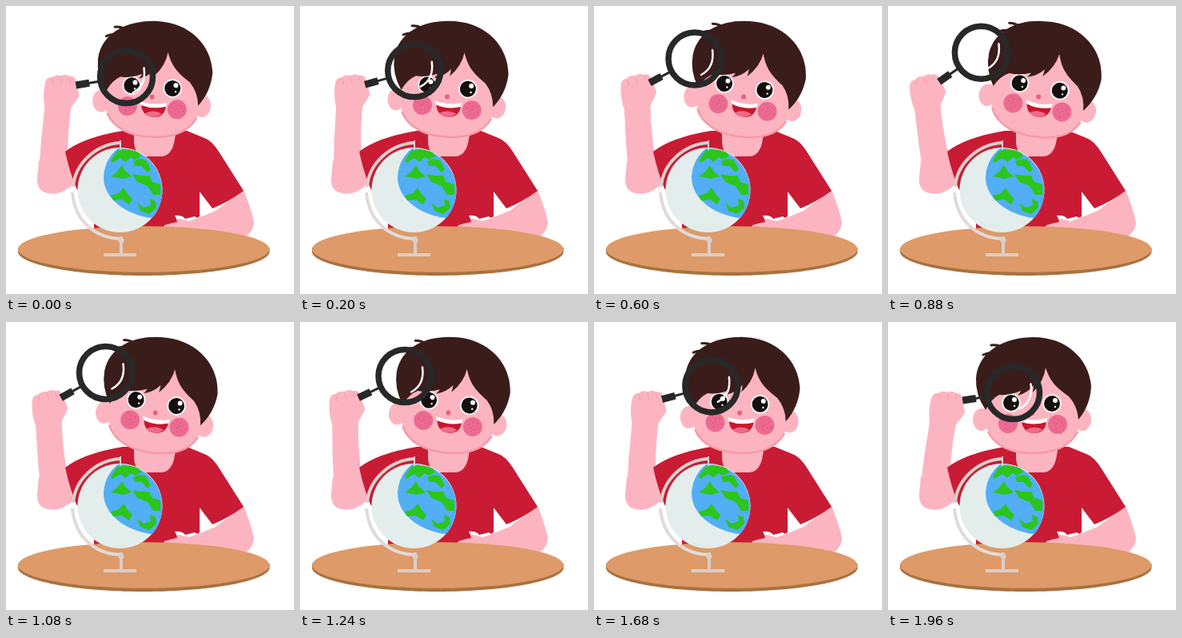
Recreate the animation shown at these times as an HTML page. Size 360x360 px, loop 2 s.

```html
<!DOCTYPE html>
<html lang="en">
<head>
<meta charset="utf-8">
<title>Boy with a globe</title>
<style>
  html, body { margin: 0; width: 100%; height: 100%; overflow: hidden; background: #fff; }
  svg { display: block; width: 100vw; height: 100vh; }
  .skin { fill: #fcb5c0; }
</style>
</head>
<body>
<svg viewBox="0 0 360 360">
  <path class="skin" d="M41 194L60 176L78 182L87 221L79 227Q66 237 52 234Q38 231 39 215Z"/>
  <g id="forearm">
    <path class="skin" d="M54 96Q56 88 63 89Q68 85 74 88Q80 85 85 89Q92 88 93 96L96 114Q90 122 85 128Q80 152 78 182V195Q60 214 42 195L45 170L52 126Q50 110 54 96Z"/>
    <path d="M63 90l1 8M74 89l1 8M85 90l0 7" fill="none" stroke="#f49cab"/>
  </g>

  <path class="skin" d="M297 230Q306 252 310 270Q310 280 300 288H220L208 274L235 267L262 256Z"/>
  <path fill="#c91b34" d="M146 156Q97 164 74 182Q79 206 88 228L110 250V278H214L242 263V232L258 253Q278 245 297 231L266 182Q257 168 248 165L226 156Z"/>
  <path fill="#fff" d="M211 262Q220 261 224 266L236 263L243 268L225 272L214 268Z"/>
  <path class="skin" d="M198 274Q207 271 214 270Q212 265 217 266L228 269Q246 263 263 258L280 280H196Z"/>
  <path class="skin" d="M160 150H214L211 166Q208 188 193 188H174Q160 187 160 168Z"/>

  <path fill="#a8723f" d="M15 302H329.500V307C329 323 259 337 172 337S15 323 15 307Z"/>
  <ellipse cx="172.200" cy="304" rx="157.200" ry="28.800" fill="#de9a68"/>

  <g id="head">
    <ellipse class="skin" cx="117" cy="122" rx="11" ry="14"/>
    <ellipse class="skin" cx="243" cy="122" rx="11" ry="14"/>
    <path class="skin" d="M122 80V122C123 151 149 165 181 165S239 151 240 122V70L195 40Z"/>
    <path fill="none" stroke="#f79aa6" stroke-width="2.500" d="M125 137C134 156 156 164 181 164S228 156 237 137"/>
    <g id="face"></g>
    <circle cx="180" cy="114" r="3" fill="#ee5f78"/>
    <path fill="#c9162d" d="M167 123Q183 127 198 122Q198 139 182 139Q168 138 167 123Z"/>
    <path fill="#fff" d="M165 120Q182 125 199 120L198 125Q182 130 167 125Z"/>
    <path fill="#f0698a" d="M172 135Q182 129 193 134Q189 139 182 139Q176 139 172 135Z"/>
    <path fill="#3a1d1a" d="M122 110Q109 91 110 70C113 36 146 19 182 19C222 19 251 45 254 80Q253 104 238 122Q237 105 226 93C212 83 203 76 197 57Q195 74 181 88Q182 83 182 79Q174 89 162 92Q165 89 166 86Q152 92 139 91Q129 96 122 110Z"/>
    <path fill="none" stroke="#3a1d1a" stroke-width="3" stroke-linecap="round" d="M148 40Q143 27 129 29M139 43Q131 35 119 41"/>
  </g>

  <g id="globe">
    <circle cx="142.500" cy="230" r="53" fill="#e3eeec"/>
    <path fill="#52aef5" d="M140 178A53 53 0 0 1 183 265C158 263 122 245 122 214Q123 192 140 178Z"/>
    <g fill="#2cc51b">
      <path d="M139 181Q152 177 166 183L169 188L161 192L156 189L149 195L143 190L133 196L131 193Z"/>
      <path d="M131 213L139 207L145 199L149 206L157 213L146 216L137 214Z"/>
      <path d="M159 194Q168 189 175 193L181 204L177 208L169 200L161 200Z"/>
      <path d="M158 210L168 212L179 212L183 220L193 223L193 236L184 236L177 225L164 220Z"/>
      <path d="M131 237L141 234L147 227L152 235L158 241L154 248L145 242L134 243Z"/>
      <path d="M164 246L172 252L181 249L180 241L187 244L188 252L179 260L168 256Z"/>
    </g>
    <g fill="none" stroke="#d9cfcb" stroke-width="4">
      <path d="M143 168V180" stroke-width="2"/>
      <path d="M143 171C111 173 86 198 84 226"/>
      <path d="M83 233C86 268 110 290 144 291" stroke="#e0dbda"/>
      <path d="M144 288V311M122 311H163"/>
    </g>
    <circle cx="144" cy="293" r="3.500" fill="#d9cfcb"/>
  </g>

  <g id="lens" fill="none">
    <g id="handle" stroke="#282828">
      <path d="M-36 0H-50" stroke-width="3"/>
      <path d="M-47 0H-64" stroke-width="9"/>
    </g>
    <circle r="33" stroke="#282828" stroke-width="7.500"/>
    <path d="M22-11Q25 11 8 20" stroke="#fff" stroke-width="2.500" stroke-linecap="round"/>
  </g>
</svg>
<script>
const byId = id => document.getElementById(id);
const dot = (x, y, r, fill) => `<circle cx="${x}" cy="${y}" r="${r}" fill="${fill}"/>`;

const eye = (x, y) => dot(x, y, 11.7, '#fff') + dot(x, y, 10, '#160f10') +
  dot(x + 4, y - 4, 3, '#fff') + dot(x + 4, y + 4, 1.2, '#fff');
const cheek = (x, y) => {
  let marks = dot(x, y, 12, '#ec6a92');
  for (let i = 0; i < 9; i++) {
    const r = 2.9 * Math.sqrt(i), a = i * 2.4;
    marks += dot(x + r * Math.cos(a), y - 1 + r * Math.sin(a), 0.6, '#c44567');
  }
  return marks;
};
byId('face').innerHTML = cheek(150, 127) + cheek(212, 128) + eye(154, 101) + eye(205, 102);

// time, lens x, lens y, handle angle, forearm angle, head angle
const poses = [
  [0, 150.5, 88.5, -9.5, -3, 3],
  [360, 136.5, 74.5, -21, -8, 6],
  [600, 126, 66, -28, -12, 8],
  [870, 116, 58, -35, -16, 9.5],
  [1240, 131, 67.5, -25, -10, 6.4],
  [1440, 138.5, 72.5, -21, -7, 4.5],
  [1960, 156.5, 88.5, -8.5, 0, 0]
];

function poseAt(time) {
  const next = Math.max(1, poses.findIndex(p => p[0] >= time));
  const a = poses[next - 1], b = poses[next];
  const k = (time - a[0]) / (b[0] - a[0]);
  return a.map((v, i) => v + (b[i] - v) * k);
}

function draw(time) {
  const [, x, y, handle, forearm, head] = poseAt(time);
  const set = (id, value) => byId(id).setAttribute('transform', value);
  set('lens', `translate(${x} ${y})`);
  set('handle', `rotate(${handle})`);
  set('forearm', `rotate(${forearm} 60 195)`);
  set('head', `rotate(${head} 187 163)`);
}

const start = performance.now();
function tick() {
  const elapsed = (performance.now() - start) % 2000;
  draw(Math.floor(elapsed / 40) * 40);
  requestAnimationFrame(tick);
}
tick();
</script>
</body>
</html>
```
